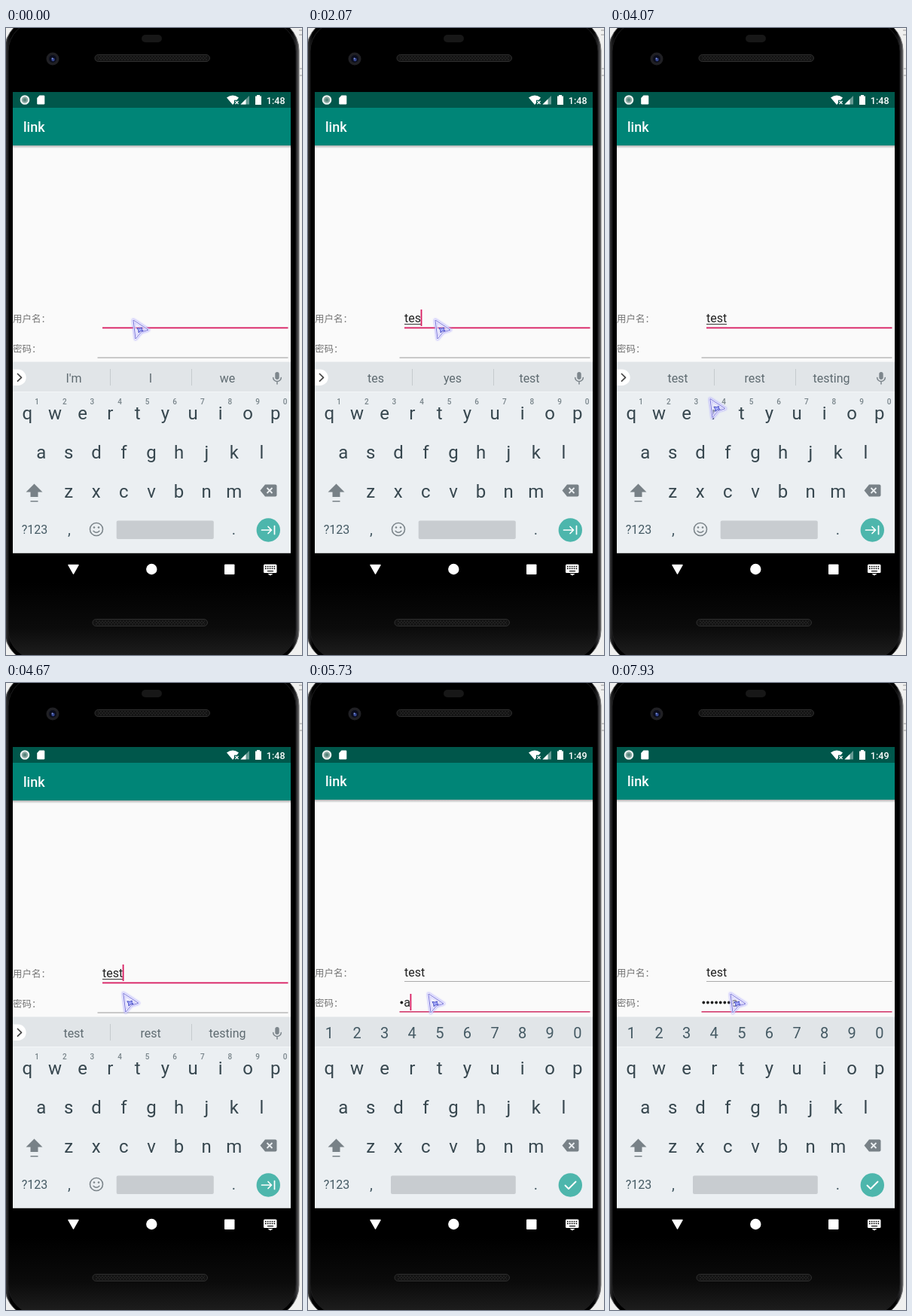
Write an HTML page that moves like this. It is 393x833 px and loops after 8 s.

```html
<!DOCTYPE html>
<html lang="zh">
<head>
<meta charset="utf-8">
<title>Login form</title>
<style>
html, body { margin: 0; width: 100%; height: 100%; overflow: hidden; background: #f0f0ef; }
svg { display: block; width: 393px; height: 833px; font-family: Roboto, "Noto Sans CJK SC", "Noto Sans CJK", sans-serif; }
.label { font: 12.5px "Noto Sans CJK SC", "Noto Sans CJK", sans-serif; fill: #757575; }
.input { font-size: 16px; fill: #212121; }
.mid { text-anchor: middle; }
.key { font-size: 24px; fill: #37474f; }
.digit { font-size: 20px; fill: #455a64; }
.hint { font-size: 10px; font-weight: 500; fill: #78848a; }
.word { font-size: 16px; fill: #5f6b71; }
.small { font-size: 16px; fill: #455a64; }
.line { fill: none; stroke-linecap: round; stroke-linejoin: round; }
</style>
</head>
<body>
<svg viewBox="0 0 393 833">
  <defs>
    <linearGradient id="rim">
      <stop offset="0" stop-color="#4b4b4d"/><stop offset=".012" stop-color="#1b1b1c"/>
      <stop offset=".022" stop-color="#000"/><stop offset=".974" stop-color="#000"/>
      <stop offset=".988" stop-color="#242426"/><stop offset="1" stop-color="#5a5a5c"/>
    </linearGradient>
    <linearGradient id="face" x2="0" y2="1">
      <stop offset=".88" stop-color="#000"/><stop offset=".95" stop-color="#0b0b0b"/>
      <stop offset="1" stop-color="#202020"/>
    </linearGradient>
    <linearGradient id="shade" x2="0" y2="1">
      <stop offset="0" stop-opacity=".3"/><stop offset="1" stop-opacity="0"/>
    </linearGradient>
    <pattern id="mesh" width="4" height="4" patternUnits="userSpaceOnUse">
      <path d="M0 0L4 4M4 0L0 4" stroke="#242424" stroke-width=".8"/>
    </pattern>
    <filter id="glow" x="-50%" y="-50%" width="200%" height="200%"><feGaussianBlur stdDeviation="1.3"/></filter>
    <clipPath id="screen"><rect x="9" y="85" width="369" height="612.5"/></clipPath>
  </defs>

  <!-- phone body -->
  <path d="M389 3h4M389 9h4M390 54h3M390 63h3" stroke="#999"/>
  <rect x="-2" y="-14" width="391" height="858" rx="44" fill="url(#rim)" stroke="#777"/>
  <rect x="3" y="-9" width="382" height="848" rx="40" fill="url(#face)" stroke="#1d1d1e"/>
  <rect x="180" y="9" width="27" height="10" rx="5" fill="#171717"/>
  <circle cx="62" cy="41" r="8.5" fill="#202024"/>
  <circle cx="62" cy="41" r="5" fill="#0b0d1c"/>
  <circle cx="62.5" cy="42" r="2.2" fill="#34458f"/>
  <circle cx="61.5" cy="40.5" r=".9" fill="#8ea2ea"/>
  <g fill="#131313" stroke="#303030">
    <rect x="118" y="35.5" width="152.5" height="9" rx="4.5"/>
    <rect x="115" y="785.5" width="152.5" height="9" rx="4.5"/>
  </g>
  <path d="M122 37h145v6H122zM119 787h145v6H119z" fill="url(#mesh)"/>

  <g clip-path="url(#screen)">
    <rect x="9" y="85" width="369" height="613" fill="#fafafa"/>
    <g id="bar">
      <rect x="9" y="156" width="369" height="4" fill="url(#shade)"/>
      <rect x="9" y="100" width="369" height="56" fill="#008577"/>
      <text x="23" y="138" font-size="18" font-weight="500" fill="#fff">link</text>
    </g>
    <rect x="9" y="85" width="369" height="21" fill="#00574b"/>
    <circle cx="25" cy="95.5" r="5.3" fill="#8aa7a1" stroke="#eef4f3" stroke-width="2"/>
    <circle cx="25" cy="95.5" r="2.2" fill="#55857c"/>
    <g fill="#fff">
      <path d="M44.5 89.5h5.5q1.3 0 1.3 1.3v9.4q0 1.3-1.3 1.3h-7.5q-1.3 0-1.3-1.3v-7.2z"/>
      <path d="M293 92.5q8-6 16 0l-2.5 3.2h-3.5v4l-2 2.3z"/>
      <path d="M304.5 97l4 4m0-4l-4 4" stroke="#fff" stroke-width="1.3"/>
      <path d="M311.5 101.5l11.5-11.5v11.5z" opacity=".4"/>
      <path d="M311.5 101.5l7-7v7z"/>
      <path d="M333 89h4v1.5h2v11.5h-8v-11.5h2z"/>
      <text id="clock" x="370.5" y="100.5" font-size="12.5" font-weight="500" text-anchor="end">1:48</text>
    </g>

    <!-- form -->
    <text id="userLabel" class="label" x="9" y="391">用户名：</text>
    <text id="passLabel" class="label" x="9" y="431">密码：</text>
    <text id="user" class="input" x="128" y="391"></text>
    <rect id="compose" x="128" y="393" height="1" fill="#333"/>
    <rect id="userLine" x="128" width="246.5"/>
    <text id="pass" class="input" y="430"></text>
    <g id="dots" fill="#212121"></g>
    <rect id="passLine" x="121.5" width="253"/>
    <rect id="caret" width="1.8" height="22" fill="#d81b60"/>

    <!-- keyboard -->
    <rect x="9" y="443" width="369" height="1" fill="#eef0f1"/>
    <rect x="9" y="444" width="369" height="39" fill="#e1e5e8"/>
    <rect x="9" y="483" width="369" height="215" fill="#ebeff2"/>
    <rect x="9" y="483" width="369" height="1" fill="#f3f6f8"/>
    <g id="keys"></g>
    <g fill="#788187">
      <path d="M37.5 605.5l11 11h-6v6.500h-10v-6.500h-6z"/>
      <rect x="32.5" y="628" width="10" height="1.5"/>
      <path d="M344 606.5h13.5q2 0 2 2v12q0 2-2 2h-13.5l-6.5-8z"/>
    </g>
    <path d="M346.5 611l7 7m0-7l-7 7" stroke="#ebeff2" stroke-width="1.8"/>
    <text class="small mid" x="38" y="672">?123</text>
    <text class="digit mid" x="84" y="673">,</text>
    <text class="digit mid" x="302.5" y="673">.</text>
    <rect id="space" y="654.5" height="24.5" rx="2" fill="#c8ccd0"/>
    <circle cx="348.3" cy="667" r="15.7" fill="#4db6ac"/>
    <g id="wordPad">
      <g id="words"></g>
      <path d="M138.5 453v22M246.5 453v22" stroke="#c5cacd"/>
      <path d="M9 453.5h7a10.700 10.700 0 0 1 0 21.400h-7z" fill="#fff"/>
      <path class="line" d="M15.5 459.5l5 4.8l-5 4.8" stroke="#444" stroke-width="1.7"/>
      <rect x="357.3" y="457" width="5.4" height="10" rx="2.7" fill="#7d868c"/>
      <path class="line" d="M354.7 464.5a5.3 5 0 0 0 10.6 0M360 470v3" stroke="#7d868c" stroke-width="1.5"/>
      <g id="hints"></g>
      <circle cx="120" cy="666" r="8.5" fill="none" stroke="#7c858b" stroke-width="1.6"/>
      <circle cx="117" cy="663.5" r="1.3" fill="#7c858b"/><circle cx="123" cy="663.5" r="1.3" fill="#7c858b"/>
      <path class="line" d="M116 668.300q4 4 8 0" stroke="#7c858b" stroke-width="1.500"/>
      <path class="line" d="M339.500 667h13M348 662.500l4.500 4.500l-4.500 4.500M356.500 661.500v11" stroke="#fff" stroke-width="1.700"/>
    </g>
    <g id="digitPad">
      <path class="line" d="M341.500 667.500l4.500 4.500l9.500-9.500" stroke="#fff" stroke-width="1.900"/>
    </g>
  </g>

  <!-- navigation -->
  <g fill="#fff">
    <path d="M83 713.500h13l-6.500 11.500z" stroke="#fff" stroke-width="1.500" stroke-linejoin="round"/>
    <circle cx="193.300" cy="719" r="7.200"/>
    <rect x="290" y="712.500" width="13.500" height="13.500" rx="1"/>
    <rect x="342" y="712.500" width="17.500" height="11.500" rx="1.500"/>
    <path d="M347.500 725h7l-3.500 2.500z"/>
    <path d="M344 715.500h14M344 718.300h14" stroke="#000" stroke-width="1.400" stroke-dasharray="1.600 1.300"/>
    <path d="M347 721.500h8" stroke="#000" stroke-width="1.200"/>
  </g>

  <g id="pointer" stroke-linejoin="round">
    <path d="M0 0L20 13L10.500 16L3 25Z" fill="none" stroke="#a6a0ff" stroke-width="4" opacity=".8" filter="url(#glow)"/>
    <path d="M0 0L20 13L10.500 16L3 25Z" fill="#f0efff" fill-opacity=".35" stroke="#fff" stroke-width="2.200"/>
    <path d="M0 0L20 13L10.500 16L3 25Z" fill="none" stroke="#716cd8" stroke-width="1"/>
    <path d="M5 10.500l3.500.5l3-1l-.3 2.500l2 1.500l-3.500.7l-2.700 2l-.3-3z" fill="#a3a8fa" stroke="#4a50c4" stroke-width="1"/>
  </g>
</svg>
<script>
const $ = id => document.getElementById(id);
const set = (id, attrs) => { for (const k in attrs) $(id).setAttribute(k, attrs[k]); };
const label = (cls, x, y, s) => `<text class="${cls} mid" x="${x}" y="${y}">${s}</text>`;
const row = (cls, s, x, y) => [...s].map((c, i) => label(cls, x + i * 36.6, y, c)).join('');

$('keys').innerHTML = row('key', 'qwertyuiop', 28.4, 520) + row('key', 'asdfghjkl', 46.7, 572)
  + row('key', 'zxcvbnm', 83.2, 624);
$('hints').innerHTML = row('hint', '1234567890', 41.2, 500);
$('digitPad').innerHTML += row('digit', '1234567890', 28.4, 472);
$('dots').innerHTML = Array.from({ length: 7 }, (_, i) => `<circle cx="${124.3 + i * 5.6}" cy="424.5" r="1.9"/>`).join('');

const LOOP = 8000, SWITCH = 4800;
const userKeys = [530, 930, 2070, 2470];
const passKeys = [5600, 5730, 6000, 6200, 6530, 6800, 7130, 7470];
const ends = [128, 133.2, 141.3, 149.9, 155];
const suggestions = [
  [0, "I'm I we"], [600, 't thanks thank'], [930, 'te the ten'],
  [2070, 'tes yes test'], [2470, 'test rest testing']
];
const caretOn = [[130, 1400], [1930, 2930], [3470, 3930], [4470, 5330], [5600, 7930]];
const path = [
  [3930, 169, 388], [4000, 152, 445], [4070, 132, 495], [4130, 122, 497], [4200, 122, 490],
  [4330, 133, 460], [4530, 150, 422], [4670, 156, 412], [4730, 160, 413]
];

const count = (times, t) => times.filter(v => t >= v).length;

function pointerAt(t) {
  const step = Math.floor((t + 4) * 0.015) / 0.015;
  const i = path.findIndex(p => p[0] > step);
  if (i === 0) return path[0].slice(1);
  if (i < 0) return path[path.length - 1].slice(1);
  const [a, b] = [path[i - 1], path[i]], k = (step - a[0]) / (b[0] - a[0]);
  return [a[1] + (b[1] - a[1]) * k, a[2] + (b[2] - a[2]) * k];
}

function draw(t) {
  const inPass = t >= SWITCH;
  const typed = count(userKeys, t), secret = count(passKeys, t);
  const up = inPass ? -1 : 0;

  $('clock').textContent = t < 5600 ? '1:48' : '1:49';
  set('bar', { transform: `translate(0 ${up})` });
  set('userLabel', { y: 391 + up });
  set('passLabel', { y: 431 + up });
  set('user', { y: 391 + up * 1.5 });
  $('user').textContent = 'test'.slice(0, typed);
  set('compose', { width: inPass ? 0 : ends[typed] - 128 });
  set('userLine', inPass ? { y: 396, height: 1, fill: '#aaa' } : { y: 397.5, height: 1.8, fill: '#d81b60' });
  set('passLine', inPass ? { y: 436, height: 1.6, fill: '#d23a6c' } : { y: 437.5, height: 1, fill: '#999' });

  const lastX = 121.7 + Math.max(0, secret - 1) * 5.6;
  $('pass').textContent = secret ? 'a' : '';
  set('pass', { x: lastX });
  [...$('dots').children].forEach((dot, i) => dot.setAttribute('opacity', i < secret - 1 ? 1 : 0));

  set('caret', {
    x: inPass ? (secret ? lastX + 8.2 : 121.3) : ends[typed] - (typed ? 0.3 : 0),
    y: inPass ? 413 : 374,
    opacity: caretOn.some(([a, b]) => t >= a && t < b) ? 1 : 0
  });

  const fade = count([4800, 4870, 4930], t) / 3;
  set('wordPad', { opacity: 1 - fade });
  set('digitPad', { opacity: fade });
  const left = fade < 0.5 ? 146.7 : 110;
  set('space', { x: left, width: 275.8 - left });
  const words = suggestions.filter(s => t >= s[0]).pop()[1].split(' ');
  $('words').innerHTML = words.map((w, i) => label('word', 90 + i * 102, 470.5, w)).join('');

  set('pointer', { transform: `translate(${pointerAt(t)})` });
}

function tick() {
  draw(performance.now() % LOOP);
  requestAnimationFrame(tick);
}
tick();
</script>
</body>
</html>
```
